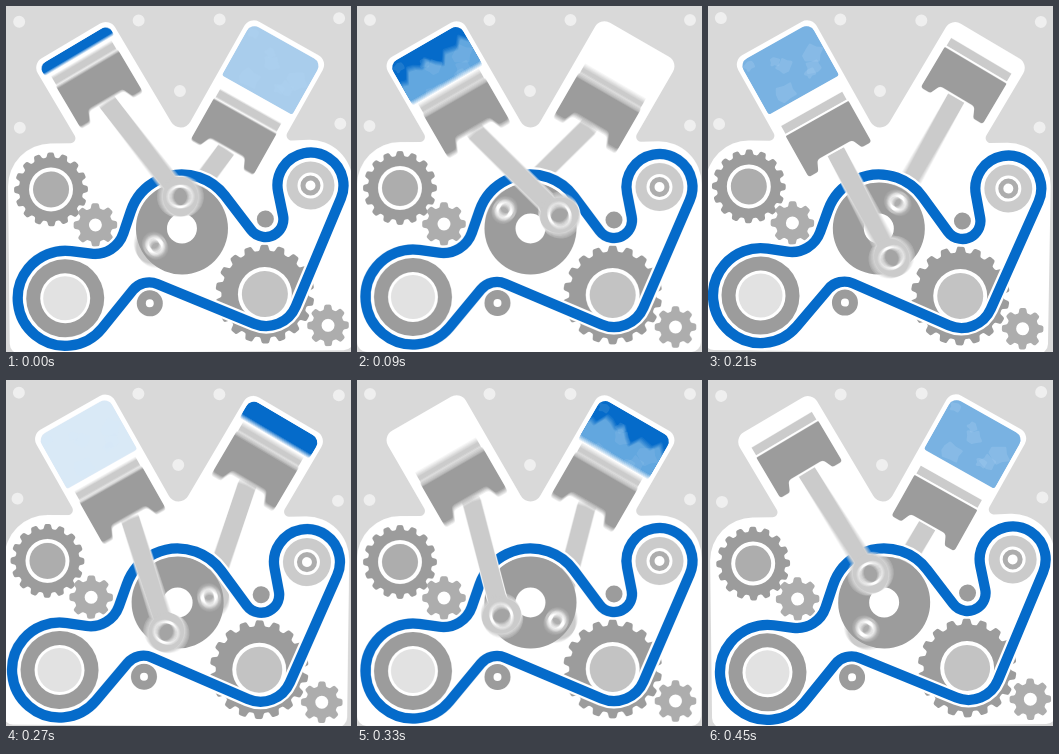
An HTML page with a canvas that plays this animation: 345 px wide and 346 px high, repeating every 480 ms.

```html
<!DOCTYPE html>
<html>
<head>
<meta charset="utf-8">
<title>Engine</title>
<style>
  html, body { margin: 0; overflow: hidden; background: #d9d9d9; }
  canvas { display: block; }
</style>
</head>
<body>
<canvas id="stage" width="345" height="346"></canvas>
<script>
const stage = document.getElementById('stage').getContext('2d');
const layer = Object.assign(document.createElement('canvas'), { width: 345, height: 346 });
const ctx = layer.getContext('2d');
const LOOP = 480, STEP = 30, SHUTTER = 15, SAMPLES = 6, TAU = Math.PI * 2;
const CRANK = { x: 173.5, y: 222.5, throw: 32, rod: 120 };
const BLUE = '#056bca', DARK = '#9c9c9c', MID = '#adadad', LIGHT = '#cbcbcb', WHITE = '#fff';
const clamp = (v, lo = 0, hi = 1) => Math.min(hi, Math.max(lo, v));

function disc(x, y, r, color) {
  ctx.fillStyle = color;
  ctx.beginPath();
  ctx.arc(x, y, r, 0, TAU);
  ctx.fill();
}

// Concentric discs, outermost first: radius, color, radius, color...
function rings(x, y, ...list) {
  for (let i = 0; i < list.length; i += 2) disc(x, y, list[i], list[i + 1]);
}

// Closed polygon of [x, y, corner radius]
function roundedPolygon(points) {
  const [x, y] = points[0], last = points[points.length - 1];
  ctx.beginPath();
  ctx.moveTo((x + last[0]) / 2, (y + last[1]) / 2);
  points.forEach(([px, py, r], i) => {
    const next = points[(i + 1) % points.length];
    ctx.arcTo(px, py, next[0], next[1], r);
  });
  ctx.closePath();
}

// The first tooth points up.
function gear(x, y, r, depth, teeth, color) {
  const pitch = TAU / teeth;
  const at = (a, q) => [x + q * Math.sin(a), y - q * Math.cos(a), 2];
  const points = [];
  for (let i = 0; i < teeth; i++) {
    const a = i * pitch;
    points.push(at(a - pitch * .34, r - depth), at(a - pitch * .2, r),
                at(a + pitch * .2, r), at(a + pitch * .34, r - depth));
  }
  ctx.fillStyle = color;
  roundedPolygon(points);
  ctx.fill();
}

// Belt wheels in order; a negative radius bends the belt the other way.
const WHEELS = [
  [56, 291, 47.5], [86.5, 217, -30], [173.5, 222.5, 54], [257, 214, -18],
  [302.5, 181, 33], [257, 289, 32], [140, 297, -21]
];

function tangentAngle([x1, y1, r1], [x2, y2, r2]) {
  const dx = x2 - x1, dy = y2 - y1;
  const angle = Math.atan2(dy, dx) - Math.acos((r1 - r2) / Math.hypot(dx, dy));
  return (angle + 2 * TAU) % TAU;
}

function belt() {
  const n = WHEELS.length;
  ctx.beginPath();
  WHEELS.forEach((wheel, i) => {
    const [x, y, r] = wheel, flip = r < 0 ? Math.PI : 0;
    const from = tangentAngle(WHEELS[(i + n - 1) % n], wheel);
    const to = tangentAngle(wheel, WHEELS[(i + 1) % n]);
    ctx.arc(x, y, Math.abs(r), from + flip, to + flip, r < 0);
  });
  ctx.closePath();
  for (const [width, color] of [[15, WHITE], [10.3, BLUE]]) {
    ctx.lineWidth = width;
    ctx.strokeStyle = color;
    ctx.stroke();
  }
}

function block() {
  ctx.fillStyle = WHITE;
  roundedPolygon([
    [0, 136, 43], [71.6, 136, 5], [25.5, 56.2, 11], [103.5, 11.2, 11], [173.5, 132.5, 11],
    [243.5, 11.2, 11], [321.5, 56.2, 11], [275.4, 136, 5], [345, 134, 43],
    [344, 346, 10], [0, 346, 10]
  ]);
  ctx.fill();
}

// Runs a drawing with the crank at the origin and the cylinder pointing up.
function inCylinder(side, draw) {
  ctx.save();
  ctx.translate(CRANK.x, CRANK.y);
  ctx.rotate(side * Math.PI / 6);
  draw();
  ctx.restore();
}

// Time counts from top dead centre.
function pose(time) {
  const age = (time + LOOP) % LOOP, a = age / LOOP * TAU;
  const x = CRANK.throw * Math.sin(a), up = CRANK.throw * Math.cos(a);
  return { age, x, y: -up, wrist: -up - Math.sqrt(CRANK.rod ** 2 - x * x) };
}

function rod({ x, y, wrist }) {
  for (const [grow, color] of [[1, WHITE], [0, LIGHT]]) {
    ctx.strokeStyle = color;
    ctx.lineWidth = 18.5 + 2 * grow;
    ctx.beginPath();
    ctx.moveTo(0, wrist);
    ctx.lineTo(x, y);
    ctx.stroke();
    disc(x, y, 20 + grow, color);
  }
}

function gas({ age, wrist }) {
  if (age < 15 || age > 350) return;
  const top = -213, half = 40.5;
  const bottom = Math.max(top + 2, Math.min(wrist - 55, -153));
  const height = bottom - top;
  ctx.save();
  ctx.beginPath();
  ctx.roundRect(-half, top, half * 2, height, [9, 9, 3, 3]);
  ctx.clip();
  ctx.globalAlpha = age < 190 ? 1 : clamp((350 - age) / 160) ** 1.8;
  ctx.fillStyle = BLUE;
  ctx.fillRect(-half, top, half * 2, height);

  // A paler front climbs from the piston, then patches lighten.
  const edge = bottom + 8 - (height + 24) * clamp((age - 75) / 105);
  const front = [[half, 0, 0], [-half, 0, 0]];
  for (let i = 0; i <= 12; i++) {
    front.push([half * (i / 6 - 1), edge + 5 * Math.sin(i * 2.1) + 4 * Math.cos(i * .9), 2]);
  }
  ctx.fillStyle = '#62a7df';
  roundedPolygon(front);
  ctx.fill();
  ctx.globalAlpha *= .5 * clamp((age - 110) / 60);
  ctx.fillStyle = '#b4d6f2';
  for (let i = 0; i < 7; i++) {
    const x = -34 + (i * 31) % 68, y = top + 8 + (i * i * 17) % 48;
    const points = [];
    for (let k = 0; k < 9; k++) {
      const a = k * TAU / 9, r = 5 + i % 3 * 2 + 2 * Math.sin(k * 2.7 + i);
      points.push([x + r * 1.2 * Math.cos(a), y + r * Math.sin(a), 1.5]);
    }
    roundedPolygon(points);
    ctx.fill();
  }
  ctx.restore();
}

function piston({ wrist }) {
  const top = wrist - 38, foot = wrist + 9, arch = foot - 11;
  ctx.fillStyle = LIGHT;
  ctx.fillRect(-35, top - 11, 70, 9);
  roundedPolygon([
    [-36, top, 1], [36, top, 1], [36, foot, 3], [25, foot, 3], [20, arch, 5],
    [-20, arch, 5], [-25, foot, 3], [-36, foot, 3]
  ]);
  ctx.strokeStyle = WHITE;
  ctx.lineWidth = 4;
  ctx.stroke();
  ctx.fillStyle = DARK;
  ctx.fill();
}

function scenery() {
  const dots = [[13, 14], [132.5, 14], [213.5, 14], [333, 14], [12.5, 120], [173, 85], [333, 119.5]];
  for (const [x, y] of dots) disc(x, y, 6, '#efefef');
  block();
  gear(43, 182, 37, 5, 16, DARK);
  rings(43, 182, 22, WHITE, 18, MID);
  gear(87, 218, 22, 5, 8, MID);
  disc(87, 218, 6.5, WHITE);
  gear(318.5, 321, 21, 5, 8, MID);
  disc(318.5, 321, 6.5, WHITE);
  gear(255.7, 289, 49.5, 6, 18, DARK);
  rings(255.7, 289, 27, WHITE, 23, '#c3c3c3');
  rings(56, 291, 39, DARK, 25, WHITE, 22, '#e2e2e2');
  rings(302.5, 181, 24, LIGHT, 13, WHITE, 10, MID, 5, WHITE);
  disc(257, 214, 8.5, DARK);
  rings(140.5, 297, 13, DARK, 4, WHITE);
}

function draw(time) {
  const left = pose(time + 37), right = pose(time + 37 + LOOP / 2);
  const sway = -.012 * Math.cos((time + 30) / LOOP * TAU);
  ctx.fillStyle = '#d9d9d9';
  ctx.fillRect(0, 0, 345, 346);
  ctx.save();
  ctx.translate(172, 0);
  ctx.rotate(sway);
  ctx.translate(-172, 0);
  scenery();
  inCylinder(1, () => { gas(right); rod(right); piston(right); });
  rings(CRANK.x, CRANK.y, 46, DARK, 15, WHITE);
  inCylinder(1, () => rings(right.x, right.y, 12, '#c4c4c4', 9, WHITE, 5, MID));
  belt();
  inCylinder(-1, () => {
    gas(left);
    rod(left);
    rings(left.x, left.y, 12, WHITE, 9, '#a4a4a4');
    piston(left);
  });
  ctx.restore();
}

// Averages several moments of the exposure for motion blur.
function expose(time) {
  for (let i = 0; i < SAMPLES; i++) {
    draw(time + SHUTTER * ((i + .5) / SAMPLES - .5));
    stage.globalAlpha = 1 / (i + 1);
    stage.drawImage(layer, 0, 0);
  }
}

function tick() {
  const time = performance.now() % LOOP;
  expose(Math.floor(time / STEP) * STEP);
  requestAnimationFrame(tick);
}
tick();
</script>
</body>
</html>
```
